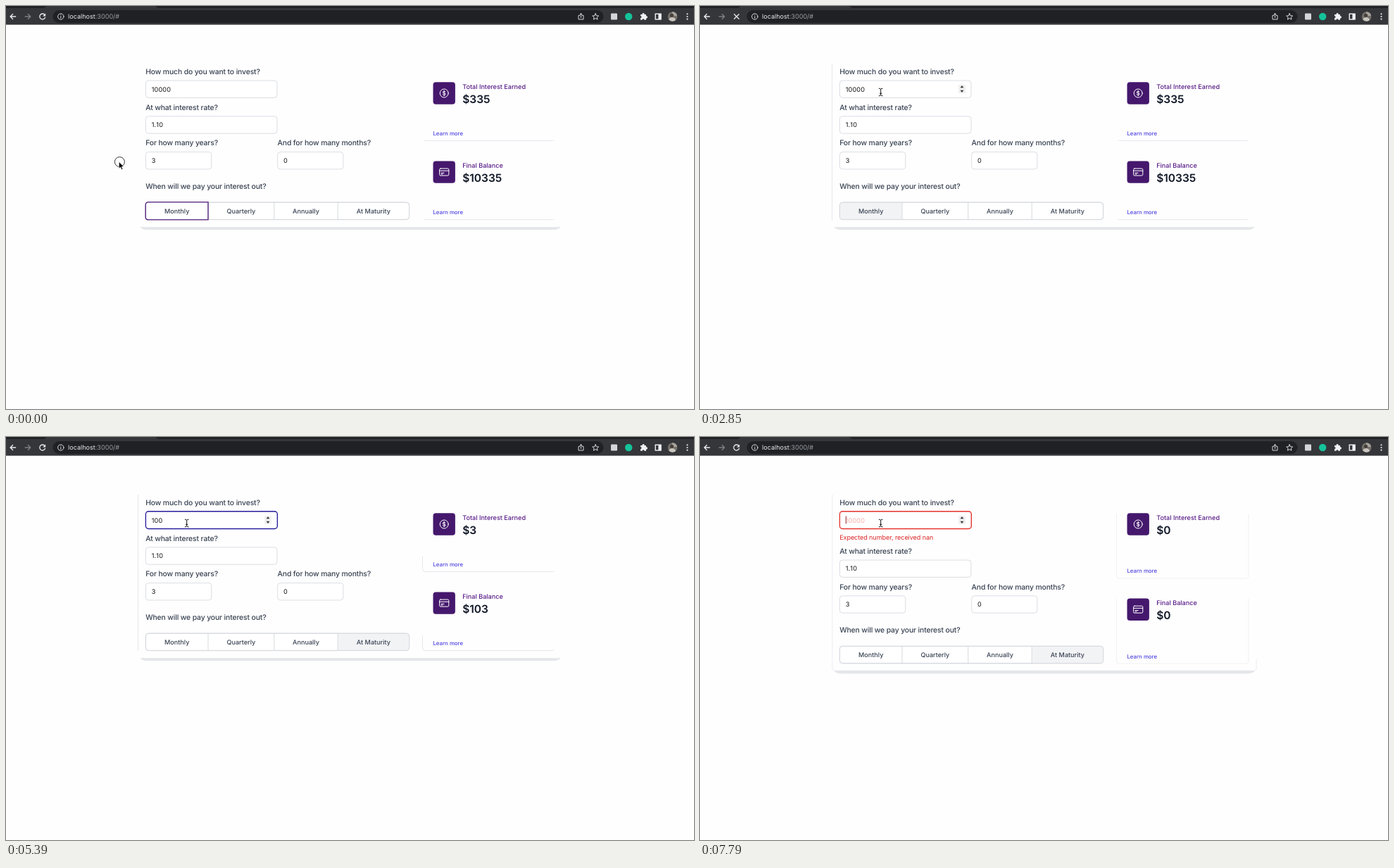
Write an HTML page that moves like this. It is 977 px wide and 573 px high and loops after 8000 ms.

```html
<!DOCTYPE html>
<html lang="en">
<head>
<meta charset="utf-8">
<title>Interest calculator</title>
<style>
  html, body { margin: 0; width: 100%; height: 100%; overflow: hidden; background: #fefefe; }
  svg { display: block; width: 100vw; height: 100vh; }
  text { font-family: Inter, "Open Sans", sans-serif; text-rendering: geometricPrecision; white-space: pre; }
  .label { font-size: 10.4px; font-weight: 500; letter-spacing: -.14px; fill: #374151; }
  .value { font-size: 9.1px; letter-spacing: .16px; font-kerning: none; fill: #111; }
  .option { font-size: 9.08px; font-weight: 500; fill: #374151; text-anchor: middle; }
  .title { font-size: 9.1px; font-weight: 500; fill: #581c87; }
  .total { font-size: 15.5px; font-weight: 600; fill: #111827; }
  .link { font-size: 7.85px; font-weight: 500; fill: #5046e0; }
  .error { font-size: 9.1px; letter-spacing: -.1px; fill: #dc2626; }
  .url { font-size: 9.07px; fill: #e8eaed; }
  .box { fill: #fff; stroke: #d1d5db; stroke-width: .8; }
  .line { fill: none; stroke: #e3e5e9; stroke-width: .9; }
  .icon { fill: none; stroke: #e8eaed; stroke-width: 1.3; stroke-linecap: round; stroke-linejoin: round; }
  .thin { stroke-width: .9; }
  .glyph { fill: none; stroke: #fff; stroke-width: 1; stroke-linecap: round; stroke-linejoin: round; }
</style>
</head>
<body>
<svg id="stage" viewBox="0 0 977 573" preserveAspectRatio="none">
  <defs>
    <clipPath id="face"><circle cx="946.5" cy="15" r="6.8"/></clipPath>
  </defs>
  <rect width="977" height="573" fill="#fefefe"/>

  <g id="toolbar">
    <rect width="977" height="26.6" fill="#35363a"/>
    <path d="M0 0H57Q56 3 52 3H0ZM213 0H977V3H218Q214 3 213 0Z" fill="#202124"/>
    <rect x="66.5" y="6" width="782" height="18" rx="9" fill="#202124"/>
    <path class="icon" d="M13.7 15H6.3M9.6 11.5L6.1 15L9.6 18.5"/>
    <path class="icon" style="stroke:#7d7f83" d="M27.2 15H34.6M31.3 11.5L34.8 15L31.3 18.5"/>
    <g id="reload">
      <path class="icon" d="M54.7 12.2A4 4 0 1 0 55.6 16.3"/>
      <path d="M56.2 10.4V14.4H52.2Z" fill="#e8eaed"/>
    </g>
    <path id="stop" class="icon" d="M48.6 11.7L55.2 18.3M55.2 11.7L48.6 18.3"/>
    <circle class="icon thin" cx="77.8" cy="15" r="4.2"/>
    <path class="icon" d="M77.8 14.8V17.2M77.8 12.8V12.9" style="stroke-width:1"/>
    <text class="url" x="88" y="18.2">localhost<tspan fill="#9aa0a6">:3000/#</tspan></text>
    <path class="icon thin" d="M814.5 13.5H813V19H820V13.5H818.5M816.5 16.5V10.8M814.7 12.4L816.5 10.6L818.3 12.4"/>
    <path class="icon thin" d="M837.2 10.7L838.5 13.7L841.7 14L839.3 16.1L840 19.2L837.2 17.5L834.4 19.2L835.1 16.1L832.7 14L835.9 13.7Z"/>
    <rect x="859" y="10.5" width="9" height="9" rx="1" fill="#d4d6da"/>
    <circle cx="884.2" cy="15" r="5.2" fill="#15c39a"/>
    <path d="M901 12H903.5A1.6 1.6 0 1 1 906.6 12H909V14.3A1.6 1.6 0 1 1 909 17.4V19.7H906.5A1.5 1.5 0 0 0 903.5 19.7H901V17A1.5 1.5 0 0 0 901 14Z" fill="#f1f3f4"/>
    <rect x="922.2" y="11.2" width="7.8" height="7.8" fill="none" stroke="#f1f3f4" stroke-width="1.4"/>
    <rect x="926.4" y="11" width="4" height="8" fill="#f1f3f4"/>
    <g clip-path="url(#face)">
      <rect x="939" y="8" width="15" height="15" fill="#77716b"/>
      <rect x="946" y="8" width="8" height="6" fill="#a8a39c"/>
      <path d="M940 23Q941 16 946 16T952 23Z" fill="#c9c5bf"/>
      <circle cx="945.5" cy="13.3" r="2.6" fill="#45403c"/>
    </g>
    <g fill="#e8eaed"><circle cx="967.5" cy="11.3" r="1.1"/><circle cx="967.5" cy="15" r="1.1"/><circle cx="967.5" cy="18.7" r="1.1"/></g>
  </g>

  <path id="band" d="M190.5 314.3H788Q785 318.2 777 318.2H201Q193 318.2 190.5 314.3Z" fill="#e4e6e9"/>
  <path id="panel" class="line" stroke-opacity=".8" d="M187.8 82V328Q187.8 332.4 192 332.4H786Q790 332.4 790 328V316"/>
  <path id="edge" class="line"/>
  <g id="cards"></g>
  <g id="form"></g>

  <circle id="ring" r="7" fill="none" stroke="#333" stroke-width="1"/>
  <path id="arrow" d="M0 0V9.8L2.3 7.7L3.9 11.2L5.6 10.4L4.1 7H7.1Z" fill="#000" stroke="#fff" stroke-width=".7"/>
  <g id="beam" fill="none" stroke-linecap="round"></g>
</svg>

<script>
const LOOP = 8000;
const $ = id => document.getElementById(id);
const set = (id, attrs) => { for (const k in attrs) $(id).setAttribute(k, attrs[k]); };
const show = (id, on) => set(id, { display: on ? "inline" : "none" });
const move = (id, x, y) => set(id, { transform: `translate(${x} ${y})` });
const text = (cls, x, y, str, id = "") => `<text ${id && `id="${id}"`} class="${cls}" x="${x}" y="${y}">${str}</text>`;
const rect = (x, y, w, h, rx = 4) => `<rect class="box" x="${x}" y="${y}" width="${w}" height="${h}" rx="${rx}"/>`;
const field = (x, y, w, str) => rect(x, y, w, 24.4) + text("value", x + 8.3, y + 15.5, str);

const BEAM = "M-2.4 -5.3Q-.4 -5.3 0 -4.2Q.4 -5.3 2.4 -5.3M0 -4.2V4.2M-2.4 5.3Q-.4 5.3 0 4.2Q.4 5.3 2.4 5.3M-1.2 1.8H1.2";
$("beam").innerHTML = `<path d="${BEAM}" stroke="#fff" stroke-width="2"/><path d="${BEAM}" stroke="#111" stroke-width="1"/>`;

const OPTIONS = [["Monthly", 198.4, 287], ["Quarterly", 287, 380.8], ["Annually", 380.8, 471.2], ["At Maturity", 471.2, 572.6]];

$("form").innerHTML =
  text("label", 198.2, 96.7, "How much do you want to invest?") +
  rect(198.4, 106, 186.6, 24.4) +
  `<rect id="focus" x="198.4" y="105.7" width="187" height="24.8" rx="4" fill="none" stroke-width="1.35"/>` +
  text("value", 206.7, 121.5, "", "amount") +
  `<rect id="caret" y="112.4" width=".9" height="11"/>
   <g id="spinner"><rect x="367" y="112" width="10" height="12" rx="1" fill="#f0f0f0"/>
   <path d="M369.5 116.2L372 113.1L374.5 116.2ZM369.5 119.8L372 122.9L374.5 119.8Z" fill="#3c3c3c"/></g>` +
  text("error", 198.2, 145.6, "Expected number, received nan", "error") +
  `<g id="rest">` +
    text("label", 198.2, 147.6, "At what interest rate?") +
    field(198.4, 156.8, 186.6, "1.10") +
    text("label", 198.2, 198.4, "For how many years?") +
    field(198.4, 207.6, 93.4, "3") +
    text("label", 385.6, 198.4, "And for how many months?") +
    field(385.7, 207.6, 93.2, "0") +
    text("label", 198.2, 259.6, "When will we pay your interest out?") +
    rect(198.4, 279.2, 374.2, 24.4) +
    `<path id="chosen" fill="#f2f3f5"/>
     <path d="M287 279V303.6M380.8 279V303.6M471.2 279V303.6" stroke="#d1d5db" stroke-width=".9"/>
     <rect x="198.4" y="279.2" width="374.2" height="24.4" rx="4" fill="none" stroke="#d1d5db" stroke-width=".8"/>
     <path id="picked" d="M202.4 278.9H287V303.9H202.4Q198.2 303.9 198.2 299.9V282.9Q198.2 278.9 202.4 278.9Z" fill="#fff" stroke="#4d1a78" stroke-width="1.35"/>` +
    OPTIONS.map(([name, a, b]) => text("option", (a + b) / 2, 294.9, name)).join("") +
  `</g>`;

const DOLLAR = `<circle class="glyph" cx="622.2" cy="124" r="6"/>
  <path class="glyph" d="M624.1 122.2Q623.6 121.4 622.2 121.4Q620.2 121.5 620.2 122.7Q620.2 123.8 622.2 124Q624.3 124.3 624.3 125.4Q624.2 126.6 622.2 126.6Q620.6 126.6 620.1 125.7M622.2 120.4V127.6"/>`;
const CREDIT = `<rect class="glyph" x="615.6" y="119" width="13.2" height="10" rx="1.5"/>
  <path class="glyph" d="M615.6 122.2H628.8M618 125.3H622M618 127H620"/>`;
const card = (id, title, glyph) =>
  `<g id="${id}"><g id="${id}Foot"><path id="${id}Line" class="line"/>${text("link", 606.4, 184.3, "Learn more")}</g>
   <rect x="606.5" y="108.3" width="31.4" height="31.4" rx="4" fill="#45186d"/>${glyph}` +
  text("title", 648.2, 118.3, title) + text("total", 648.2, 137.5, "", id + "Sum") + `</g>`;
$("cards").innerHTML = card("earned", "Total Interest Earned", DOLLAR) + card("final", "Final Balance", CREDIT);

// [time, ...values]; each entry holds until the next
const pointer = [
  [0, 160.3, 221.5], [300, 150, 233], [450, 150, 208], [600, 158, 176], [750, 170, 143], [900, 177.5, 127.2],
  [1050, 157, 174], [1200, 149, 188], [1350, 146.5, 195], [1800, 145.8, 193.8], [1950, 172, 181],
  [2100, 214, 152], [2250, 245, 130], [2400, 256.7, 122.5]
];
const amounts = [[0, 10000], [4340, 1000], [4790, 100], [5540, 10], [6140, 1], [7790, 0]];
const blink = [[0, 0], [3890, 1], [4490, 0], [4940, 1], [5390, 0], [5840, 1], [6290, 0], [6890, 1], [7340, 0], [7790, 1]];
const at = (track, t) => track.filter(k => k[0] <= t).pop().slice(1);
const within = (t, a, b) => t >= a && t < b;

function draw(t) {
  const blurred = t >= 1350, reset = t >= 3150, focused = t >= 3890, invalid = t >= 7790;
  const [amount] = at(amounts, t), [x, y] = at(pointer, t);
  const drop = invalid ? 18.2 : 0;

  show("reload", !within(t, 2850, 3450));
  show("stop", within(t, 2850, 3450));

  const over = t >= 2250;
  show("arrow", !over);
  show("beam", over);
  move(over ? "beam" : "arrow", x, y);
  show("ring", t < 150 || within(t, 1350, 1500) || within(t, 3890, 4040));
  move("ring", over ? x : x + 1.1, over ? y : y + .1);

  $("amount").textContent = amount || 10000;
  set("amount", { style: invalid ? "fill:#fca9a9" : "" });
  show("spinner", over);
  show("focus", focused);
  set("focus", { stroke: invalid ? "#e8352f" : "#2b209f" });
  show("caret", at(blink, t)[0]);
  const digits = amount ? String(amount).length : 0;
  set("caret", { x: digits ? 205.4 + 5.75 * digits : 206.8, fill: invalid ? "#7f1d1d" : "#111" });
  show("error", invalid);
  move("rest", 0, drop);

  show("picked", !blurred);
  show("chosen", blurred);
  set("chosen", { d: reset
    ? "M471.6 279.6H569Q572.2 279.6 572.2 283V300Q572.2 303.2 569 303.2H471.6Z"
    : "M286.6 279.6H202Q198.8 279.6 198.8 283V300Q198.8 303.2 202 303.2H286.6Z" });

  const interest = reset ? Math.floor(amount * .033) : 335;
  $("earnedSum").textContent = "$" + interest;
  $("finalSum").textContent = "$" + (amount + interest);
  move("earnedFoot", 0, drop / 2);
  move("final", 0, 112.1 + drop / 2);
  move("finalFoot", 0, drop / 2);
  const line = invalid ? "M591.5 100V188Q591.5 192 595.5 192H775Q779 192 779 188V100"
    : reset ? "M591.5 170V187.6Q591.5 191.6 595.5 191.6H775Q777.5 191.6 778 190" : "M594 191.2Q596 191.7 600 191.7H773Q777 191.7 778 191";
  for (const id of ["earned", "final"])
    set(id + "Line", { d: line, "stroke-opacity": invalid ? .6 : 1 });

  move("band", 0, drop);
  show("panel", invalid);
  show("edge", blurred && !invalid);
  set("edge", { d: `M187.6 ${t < 1950 ? 186 : t < 2850 ? 104 : 82}V304` });
}

function tick(now) {
  draw(now % LOOP);
  requestAnimationFrame(tick);
}
draw(0);
requestAnimationFrame(tick);
</script>
</body>
</html>
```
